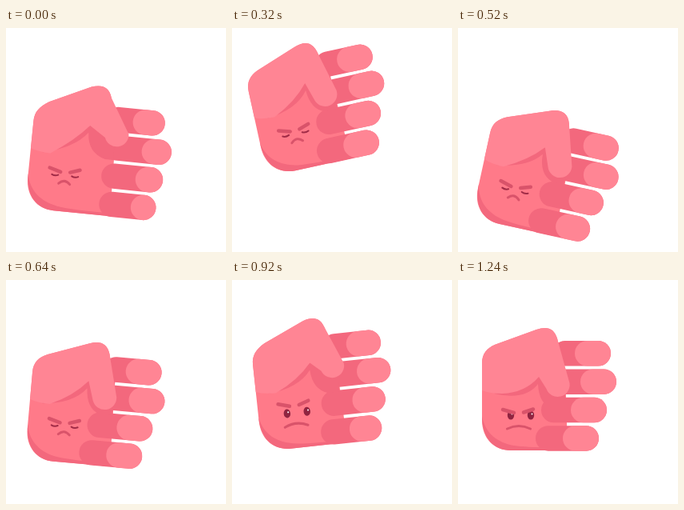
Write an HTML page that moves like this. It is 275x280 px and loops after 1.52 s.

```html
<!DOCTYPE html>
<html lang="en">
<head>
<meta charset="utf-8">
<title>Fist</title>
<style>
html, body { margin: 0; width: 100%; height: 100%; overflow: hidden; background: #fff; }
svg { display: block; width: 100%; height: 100%; }
.light { fill: #ff8594; }
.mid { fill: #ff7a89; }
.dark { fill: #f3687d; }
.line { fill: none; stroke: #d9536a; stroke-linecap: round; stroke-linejoin: round; }
.eye { fill: #8f2440; }
.lid { fill: none; stroke: #a12c47; stroke-width: 2; stroke-linecap: round; }
</style>
</head>
<body>
<svg viewBox="0 0 275 280">
  <g id="hand">
    <path id="palm" class="mid"/>
    <path class="dark" d="M30 170C30 198 45 213 66 213H137V209Q90 210 70 207C49 203 34 192 30 170Z"/>
    <g id="fingers"></g>
    <path id="shade" class="dark"/>
    <path id="thumb" class="light"/>
    <g id="eyes"></g>
    <path id="brows" class="line" stroke-width="4.5"/>
    <path id="mouth" class="line" stroke-width="3"/>
  </g>
</svg>
<script>
const LOOP = 1520, STEP = 40;
const $ = id => document.getElementById(id);
const mix = (a, b, p) => a + (b - a) * p;
const span = (t, a, b) => Math.min(1, Math.max(0, (t - a) / (b - a)));
const swing = p => p * p * p * (p * (6 * p - 15) + 10);
const pulse = (t, a, b) => Math.sin(Math.PI * span(t, a, b)) ** 2;

function set(el, attrs) {
  for (const k in attrs) el.setAttribute(k, attrs[k]);
  return el;
}
function make(tag, parent, attrs) {
  const el = document.createElementNS("http://www.w3.org/2000/svg", tag);
  parent.append(el);
  return set(el, attrs);
}

const REST = { x: 105, y: 140, turn: 0, clench: 0 };
const LOW = { x: 106, y: 187.5, turn: 14, clench: 1 };
const HIGH = { x: 101.5, y: 93, turn: -14, clench: 1 };

// the loop begins in the middle of the first drop
const SWINGS = [
  { from: REST, to: LOW, start: -132, end: 160 },
  { from: LOW, to: HIGH, start: 160, end: 360 },
  { from: HIGH, to: LOW, start: 360, end: 560 },
  { from: LOW, to: HIGH, start: 560, end: 760 },
  { from: HIGH, to: REST, start: 760, end: 980 }
];
const SETTLE = 760, TURN_END = 1060;

const FINGERS = [191, 198, 186, 176].map((right, i) => {
  const pill = cls => make("rect", $("fingers"),
    { class: cls, y: 76 + 35.4 * i, height: 31.5, rx: 15.75 });
  return { right, i, base: pill("dark"), tip: pill("light") };
});

const EYES = [66, 91].map(x => ({
  x,
  ball: make("ellipse", $("eyes"), { class: "eye", cx: x, cy: 169, rx: 4.2 }),
  glint: make("circle", $("eyes"), { cx: x + 1.5, cy: 167.5, r: 1, fill: "#fff" }),
  lid: make("path", $("eyes"), { class: "lid" })
}));

function drawFingers(open) {
  for (const { right, i, base, tip } of FINGERS) {
    const left = 118 - 7 * i + (2 + 8 * i) * open;
    const end = right + (3 + 5 * i) * open;
    const len = 45 - (5 + 3 * i) * open;
    set(base, { x: left, width: end - left });
    set(tip, { x: end - len, width: len });
  }
}

function drawPalm(open, raise, clench) {
  const k = -8 * raise;
  const x = 125 - 2 * clench + 12 * open;
  const y = 132 - 3 * clench - 20 * raise;
  const a = 121 - 12 * clench - 14 * raise;
  const top = `V104C30 92 36 85 47 ${80.5 + k * .3}L98 ${62 + k}` +
    `C111 ${57.5 + k} 120 ${60 + k} 124 ${73 + k}`;
  set($("palm"), { d: `M30 175${top}L134 112L137 213H66C45 213 30 198 30 175Z` });
  set($("thumb"), {
    d: `M30 138${top}L${x + 14.5} ${y - 3}A15 15 0 0 1 ${x - 14.5} ${y + 4}` +
      `L101 ${a}Q84 ${a + 20} 55 142Q40 142 30 138Z`
  });
  set($("shade"), {
    d: `M45 142Q84 ${a + 30} 100 ${a + 9}Q101 ${a + 34} ${118 + 6 * open} ${a + 40}` +
      `H134V${a - 8}H101V${a}Z`
  });
}

function drawFace(open, lift) {
  for (const { x, ball, glint, lid } of EYES) {
    set(ball, { ry: 5.5 * open, opacity: open > .15 ? 1 : 0 });
    set(glint, { opacity: open > .6 ? 1 : 0 });
    const l = x - 2.5;
    set(lid, { d: `M${l - 4} 168Q${l} 170 ${l + 4} 168`, opacity: open > .15 ? 0 : 1 });
  }
  const b = mix(161.5, 163.5, open) - 6 * lift;
  set($("brows"), { d: `M56 ${b - 1.5}L70 ${b + 2.5}M82 ${b + 2}L94 ${b - 2}` });
  const w = mix(7, 14.5, open), y = mix(178.5, 186, open);
  set($("mouth"), { d: `M${76 - w} ${y}Q76 ${y - 7} ${76 + w} ${y}` });
}

function draw(t) {
  const s = SWINGS.find(s => t < s.end) || SWINGS[SWINGS.length - 1];
  const ease = end => swing(span(t, s.start, end));
  const at = (key, end = s.end) => mix(s.from[key], s.to[key], ease(end));
  const turn = at("turn", s.start === SETTLE ? TURN_END : s.end);
  set($("hand"), {
    transform: `translate(${at("x")} ${at("y")}) rotate(${turn}) translate(-105 -140)`
  });

  // the fist loosens on every way down
  const open = s.to === HIGH ? 0 : pulse(t, s.start, s.end) ** 2;
  const raise = Math.max(open, pulse(t, SETTLE, 1240));
  drawFingers(open);
  drawPalm(open, raise, at("clench"));
  drawFace(swing(span(t, SETTLE, 880)), pulse(t, SETTLE, 1120));
}

const start = performance.now();
function tick() {
  const t = (performance.now() - start) % LOOP;
  draw(Math.floor(t / STEP) * STEP);
  requestAnimationFrame(tick);
}
tick();
</script>
</body>
</html>
```
